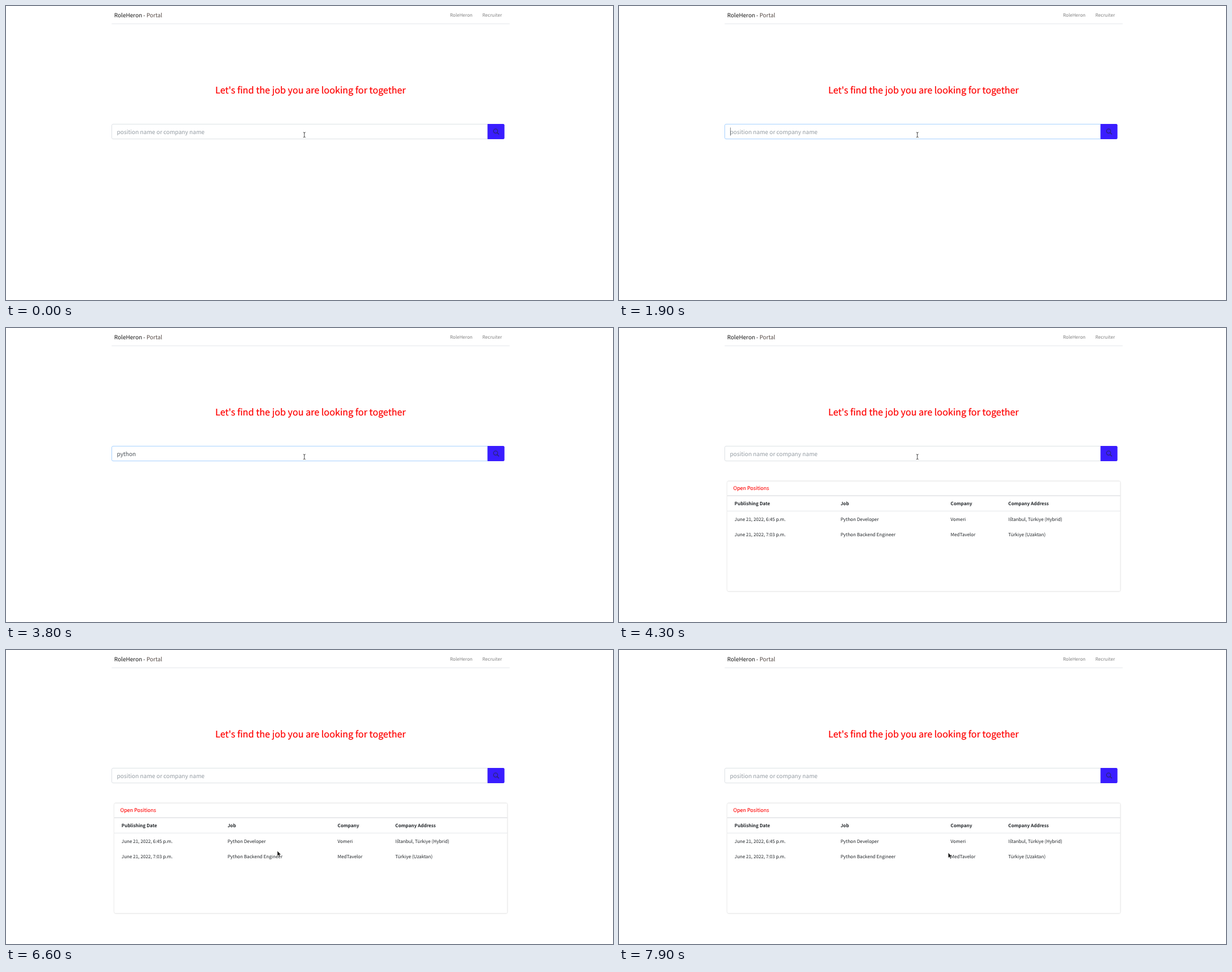
An HTML page for the animation above (8000 ms loop, 1076 px wide and 521 px high).

```html
<!DOCTYPE html>
<html lang="en">
<head>
<meta charset="utf-8">
<title>Job portal search</title>
<style>
  html, body { margin: 0; width: 100%; height: 100%; overflow: hidden; background: #fff; }
  svg { display: block; }
  text {
    font: 8.14px "Noto Sans CJK JP", "Noto Sans CJK SC", "Noto Sans CJK KR", "Noto Sans CJK TC", "Noto Sans CJK", "Open Sans", sans-serif;
    fill: #212529;
    text-rendering: geometricPrecision;
  }
  .brand { font-size: 10.03px; fill: #161616; }
  .light { font-weight: 300; fill: #554a45; }
  .nav { fill: #808080; }
  .title { font-size: 16.19px; fill: #f00; stroke: #f00; stroke-width: .2px; }
  .field { font-size: 10.15px; fill: #495057; }
  .hint { fill: #939ba2; }
  .heading { font-size: 9px; fill: #f00; stroke: #f00; stroke-width: .1px; }
  .head text { font-weight: 700; }
  .card { fill: #fff; filter: drop-shadow(0 0 .7px rgba(0,0,0,.125)) drop-shadow(0 .7px 1.2px rgba(0,0,0,.2)); }
</style>
</head>
<body>
<svg width="1076" height="521" viewBox="0 0 1076 521">
  <text class="brand" x="191.8" y="19.9">RoleHeron</text>
  <text class="brand" x="243.3" y="19.9">-</text>
  <text class="brand light" x="248.9" y="19.9">Portal</text>
  <text class="nav" x="786.9" y="19.2">RoleHeron</text>
  <text class="nav" x="844.5" y="19.2">Recruiter</text>
  <rect x="187.3" y="31.3" width="705.5" height=".8" fill="#dee2e6"/>

  <text class="title" x="371.1" y="155">Let's find the job you are looking for together</text>

  <path id="box" d="M853.8 209.4H189.9a2.4 2.4 0 0 0-2.4 2.4V233.2a2.4 2.4 0 0 0 2.4 2.4H853.8Z" fill="#fff" stroke-width=".7"/>
  <text id="hint" class="field hint" x="196.5" y="226.6">position name or company name</text>
  <text id="typed" class="field" x="196.5" y="226.6"></text>
  <rect id="caret" y="215.4" width=".7" height="14.2" fill="#495057"/>
  <path d="M853.6 209H881.4a2.2 2.2 0 0 1 2.2 2.2V233.7a2.2 2.2 0 0 1-2.2 2.2H853.6Z" fill="#3a1dff"/>
  <g fill="none" stroke="#2b2480" stroke-width="1.3">
    <circle cx="867.9" cy="221.6" r="3.7"/>
    <path d="M870.6 224.3L873.8 227.5" stroke-width="1.7"/>
  </g>

  <g id="results">
    <rect class="card" x="192" y="271.5" width="696.6" height="195" rx="2.8"/>
    <text class="heading" x="202.6" y="287.4">Open Positions</text>
    <rect x="192" y="296.6" width="696.6" height="1.3" fill="#dcdee0"/>
    <rect x="192" y="323.9" width="696.6" height=".8" fill="#dee2e6"/>
    <g class="head" id="head"></g>
    <g id="rows"></g>
  </g>

  <path id="beam" d="M526.9 223.8Q528.9 223.8 528.9 225.2Q528.9 223.8 530.9 223.8M528.9 225V231.6M526.9 232.8Q528.9 232.8 528.9 231.4Q528.9 232.8 530.9 232.8" fill="none" stroke="#333" stroke-width=".9"/>
  <path id="arrow" d="M0 0V9.3L2.2 7.3 3.7 10.8 5.2 10.1 3.8 6.7H6.5Z" fill="#111" stroke="#fff" stroke-width=".5"/>
</svg>
<script>
const LOOP = 8000;
const TEXT_X = 196.5;
const COLUMNS = [204.8, 392.7, 587.8, 690.1];
const $ = id => document.getElementById(id);

// Each entry holds from its time until the next one.
const typing = [[0, ""], [2400, "p"], [2500, "py"], [2700, "pyt"], [2900, "pyth"], [3000, "pytho"], [3200, "python"], [4300, ""]];
const borders = [[0, "#ced4da"], [700, "#9fc7ef"], [800, "#80bdff"], [4300, "#ced4da"]];
const carets = [[0, false], [700, true], [1300, false], [1900, true], [3800, false]];
const pointer = [
  [0, null], [6000, [507.6, 291.6]], [6100, [495, 318]], [6200, [484.5, 338]], [6300, [480.3, 346.3]],
  [6500, [478.6, 349]], [6600, [481, 356]], [6700, [491, 365]], [6800, [508, 372]],
  [6900, [528, 377]], [7000, [545, 379]], [7100, [552.3, 379.2]],
  [7700, [561, 373]], [7800, [574, 365]], [7900, [583.6, 359.3]]
];

const at = (track, time) => track.findLast(([start]) => start <= time)[1];
const show = (node, visible) => node.setAttribute("visibility", visible ? "visible" : "hidden");

function addRow(group, y, cells) {
  cells.forEach((label, i) => {
    const node = document.createElementNS("http://www.w3.org/2000/svg", "text");
    node.setAttribute("x", COLUMNS[i]);
    node.setAttribute("y", y);
    node.textContent = label;
    group.append(node);
  });
}

addRow($("head"), 314.3, ["Publishing Date", "Job", "Company", "Company Address"]);
addRow($("rows"), 341.5, ["June 21, 2022, 6:45 p.m.", "Python Developer", "Vomeri", "İstanbul, Türkiye (Hybrid)"]);
addRow($("rows"), 368.7, ["June 21, 2022, 7:03 p.m.", "Python Backend Engineer", "MedTavelor", "Türkiye (Uzaktan)"]);

function draw() {
  const time = performance.now() % LOOP;
  const word = at(typing, time);
  const tip = at(pointer, time);

  $("typed").textContent = word;
  show($("hint"), !word);
  $("box").setAttribute("stroke", at(borders, time));
  $("caret").setAttribute("x", TEXT_X + .6 + (word ? $("typed").getComputedTextLength() : 0));
  show($("caret"), at(carets, time));
  show($("results"), time >= 4300);
  show($("beam"), !tip);
  show($("arrow"), tip);
  if (tip) $("arrow").setAttribute("transform", `translate(${tip})`);
  requestAnimationFrame(draw);
}
draw();
</script>
</body>
</html>
```
